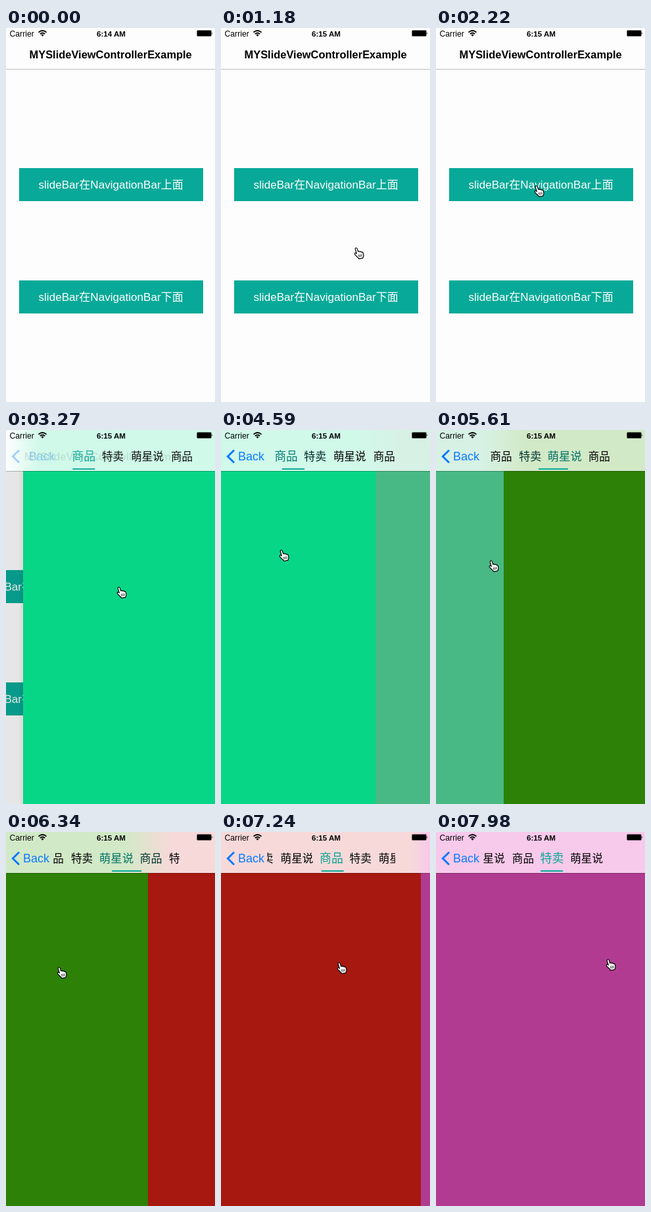
Write an HTML page that moves like this. It is 318 px wide and 566 px high and loops after 8 s.

```html
<!DOCTYPE html>
<html lang="zh-CN">
<head>
<meta charset="utf-8">
<title>Slide view controller</title>
<style>
  html, body { margin: 0; width: 100%; height: 100%; overflow: hidden; background: #fdfdfd; }
  svg { display: block; width: 100vw; height: 100vh; }
  text { font-family: "Liberation Sans", "Noto Sans CJK SC", "Noto Sans CJK", sans-serif; white-space: pre; }
  .mid { text-anchor: middle; }
  .bold { font-weight: bold; }
  #strip { font-weight: 500; font-family: "Noto Sans CJK SC", "Noto Sans CJK", sans-serif; }
</style>
</head>
<body>
<svg viewBox="0 0 318 566">
  <defs>
    <linearGradient id="tint" gradientUnits="userSpaceOnUse" y1="0" y2="0">
      <stop id="tintLeft" offset="0"/><stop id="tintRight" offset="1"/>
    </linearGradient>
    <linearGradient id="edge">
      <stop offset="0" stop-opacity="0"/><stop offset="1" stop-opacity=".06"/>
    </linearGradient>
    <clipPath id="tabClip"><rect x="70.5" y="20" width="194.5" height="42"/></clipPath>
  </defs>

  <rect width="318" height="566" fill="#fdfdfd"/>
  <g id="home">
    <g fill="#08a998">
      <rect x="20" y="212" width="280" height="50"/>
      <rect x="20" y="382" width="280" height="50"/>
    </g>
    <g class="mid" fill="#fff" font-size="17.1">
      <text x="159.7" y="243">slideBar在NavigationBar上面</text>
      <text x="159.7" y="413">slideBar在NavigationBar下面</text>
    </g>
  </g>
  <rect id="dim" y="62" width="318" height="504"/>
  <g id="pages"><rect x="-7" y="62" width="7" height="504" fill="url(#edge)"/></g>

  <rect width="318" height="62" fill="url(#tint)"/>
  <rect y="62" width="318" height="1" fill-opacity=".25"/>
  <text id="title" class="bold" y="46" font-size="16.45">MYSlideViewControllerExample</text>
  <g id="back" fill="#0b7aff">
    <path d="M20 30.5L10.3 40L20 49.5" fill="none" stroke="#0b7aff" stroke-width="3"/>
    <text id="backLabel" y="46" font-size="18">Back</text>
  </g>
  <g id="tabs"><g clip-path="url(#tabClip)"><g id="strip" class="mid">
    <rect id="marker" y="58" height="2" fill="#08a998"/>
  </g></g></g>

  <text x="5.5" y="13" font-size="12.2">Carrier</text>
  <g fill="none" stroke="#000" stroke-width="1.8">
    <path d="M49.5 6.7Q55.5 1.2 61.5 6.7M51.8 9.1Q55.5 5.8 59.2 9.1"/>
    <path d="M53.4 10.4Q55.5 8.8 57.6 10.4L55.5 12.8Z" fill="#000" stroke="none"/>
  </g>
  <text id="clock" class="mid bold" x="160" y="12.7" font-size="11.6"></text>
  <rect x="290.5" y="3.5" width="22" height="9" rx="1.5" fill="none" stroke="#000" stroke-opacity=".5"/>
  <rect x="291" y="4" width="21" height="8" rx=".6"/>
  <path d="M313.4 6.3q1.8 1.7 0 3.4z"/>

  <g id="cursor" stroke="#000" stroke-linejoin="round">
    <path fill="#fff" stroke-width="1.2" d="M3.3.8c1-.2 1.8.4 2.1 1.5L6.6 6.4c.7-.8 2.3-.7 2.7.4.7-.8 2.2-.5 2.6.6.9-.5 2.2 0 2.4 1.2l.7 3.2c.2 1.7-.9 2.6-1.1 4.4L8 17.4c-1.2-2-3.6-3.5-6.3-6.6C.6 9.2 1.8 7.9 3.1 8.5l1.2.9L2.4 3.2C2.1 2 2.4 1 3.3.8z"/>
    <path fill="none" stroke-width=".8" d="M7.4 10.8l.7 4M9.6 10.5l.5 4M11.8 10.3l.3 3.8"/>
  </g>
</svg>
<script>
const LOOP = 8000, WIDTH = 318, FIRST = 294, STEP = 147.4;
const PUSH_START = 2920, SWIPE_TIME = 560;
const HOME_TINT = '#fdfdfd';
const PAGES = [
  { color: '#08d687', tint: '#d0f9ea' },
  { color: '#48b985', tint: '#d7f2e5' },
  { color: '#2d8106', tint: '#d2e9c7' },
  { color: '#a71810', tint: '#f7d9d9' },
  { color: '#b13b90', tint: '#f7c9ea' }
];
const LABELS = ['商品', '特卖', '萌星说', '商品', '特卖', '萌星说'];

// Each swipe drags the hand left, then returns it to rest while the page settles.
const SWIPES = [
  { start: 4355, drag: [87, 181], rest: [242, 197] },
  { start: 5295, drag: [80, 197], rest: [235, 204] },
  { start: 6108, drag: [77, 204], rest: [242, 200] },
  { start: 7110, drag: [90, 194], rest: [258, 192] }
];
const HAND_START = [216, 383];
const MOVES = [
  { at: 300, time: 300, to: [216, 370] },
  { at: 780, time: 1050, to: [156, 211] },
  { at: 1830, time: 380, to: [149, 238] },
  { at: 2700, time: 520, to: [168, 237] },
  { at: 3300, time: 900, to: [214, 190] },
  ...SWIPES.flatMap(({ start, drag, rest }) => [
    { at: start, time: 260, to: drag },
    { at: start + 320, time: 540, to: rest }
  ])
];

const $ = id => document.getElementById(id);
const clamp = (v, lo, hi) => Math.min(hi, Math.max(lo, v));
const lerp = (a, b, k) => a + (b - a) * k;
const set = (el, attrs) => { for (const key in attrs) el.setAttribute(key, attrs[key]); };
const move = (el, x, y = 0) => set(el, { transform: `translate(${x} ${y})` });

// Cubic ease in and out of a span of time.
function ease(t, start, duration) {
  const u = clamp((t - start) / duration, 0, 1);
  return u < .5 ? 4 * u ** 3 : 1 - 4 * (1 - u) ** 3;
}

function add(parent, tag, attrs) {
  const el = document.createElementNS('http://www.w3.org/2000/svg', tag);
  set(el, attrs);
  return parent.appendChild(el);
}

PAGES.forEach(({ color }, i) =>
  add($('pages'), 'rect', { x: i * WIDTH, y: 62, width: WIDTH, height: 504, fill: color }));

let tabX = 82.5;
const tabs = LABELS.map(label => {
  const width = label.length * 16.6;
  const el = add($('strip'), 'text', { y: 46.2 });
  el.textContent = label;
  const tab = { el, width, left: tabX, center: tabX + width / 2 };
  tabX += width + 11;
  return tab;
});
const maxScroll = tabX - 265;

const pushAt = t => {
  const p = t < PUSH_START ? 0 : 1 - Math.exp((PUSH_START - t) / 133.5);
  return p > .996 ? 1 : p;
};
const pageAt = t => SWIPES.reduce((sum, s) => sum + ease(t, s.start, SWIPE_TIME), 0);

// After a swipe the selected tab scrolls towards the middle of the strip.
const scrollAt = t => SWIPES.reduce((x, s, i) => {
  const goal = clamp(tabs[i + 1].center - 168, 0, maxScroll);
  return lerp(x, goal, ease(t, s.start + SWIPE_TIME + 30, 280));
}, 0);

const handAt = t => MOVES.reduce((pos, m) => {
  const k = ease(t, m.at, m.time);
  return pos.map((v, i) => lerp(v, m.to[i], k));
}, HAND_START);

function drawTabs(page, scroll) {
  tabs.forEach((tab, i) => {
    const active = Math.max(0, 1 - Math.abs(page - i));
    set(tab.el, {
      x: tab.center,
      'font-size': 16.6 + 1.4 * active,
      fill: `rgb(${8 * active},${169 * active},${152 * active})`
    });
  });
  const from = tabs[Math.floor(page)], to = tabs[Math.ceil(page)], k = page % 1;
  set($('marker'), {
    x: Math.round(lerp(from.left, to.left, k) - 1),
    width: Math.round(lerp(from.width, to.width, k) + 1)
  });
  move($('strip'), -scroll);
}

function drawTint(seam, left, right) {
  const half = Math.min(35, seam, WIDTH - seam);
  set($('tint'), { x1: seam - half, x2: seam + half + .01 });
  set($('tintLeft'), { 'stop-color': left });
  set($('tintRight'), { 'stop-color': right });
}

function draw(t) {
  const time = t < FIRST ? 0 : FIRST + 12 + STEP * Math.floor((t - FIRST) / STEP);
  const push = pushAt(time);
  const page = pageAt(time);
  const index = Math.floor(page);
  const next = Math.min(index + 1, PAGES.length - 1);

  move($('home'), -95 * push);
  set($('dim'), { opacity: .1 * push });
  move($('pages'), push ? Math.round(WIDTH * (1 - push - page)) : WIDTH + 10);

  if (push < 1) drawTint(WIDTH * (1 - push), HOME_TINT, PAGES[0].tint);
  else drawTint(WIDTH * (1 - page % 1), PAGES[index].tint, PAGES[next].tint);

  set($('title'), { x: lerp(35.5, 27, push), opacity: 1 - push });
  set($('back'), { opacity: push ** 13 });
  set($('backLabel'), { x: lerp(130, 26, push) });
  set($('tabs'), { opacity: push });
  move($('tabs'), 235 * (1 - push));
  drawTabs(page, scrollAt(time));

  $('clock').textContent = time ? '6:15 AM' : '6:14 AM';
  set($('cursor'), { opacity: time ? 1 : 0 });
  move($('cursor'), ...handAt(time).map(Math.round));
}

const start = performance.now();
function tick(now) {
  draw(Math.max(0, now - start) % LOOP);
  requestAnimationFrame(tick);
}
draw(0);
requestAnimationFrame(tick);
</script>
</body>
</html>
```
